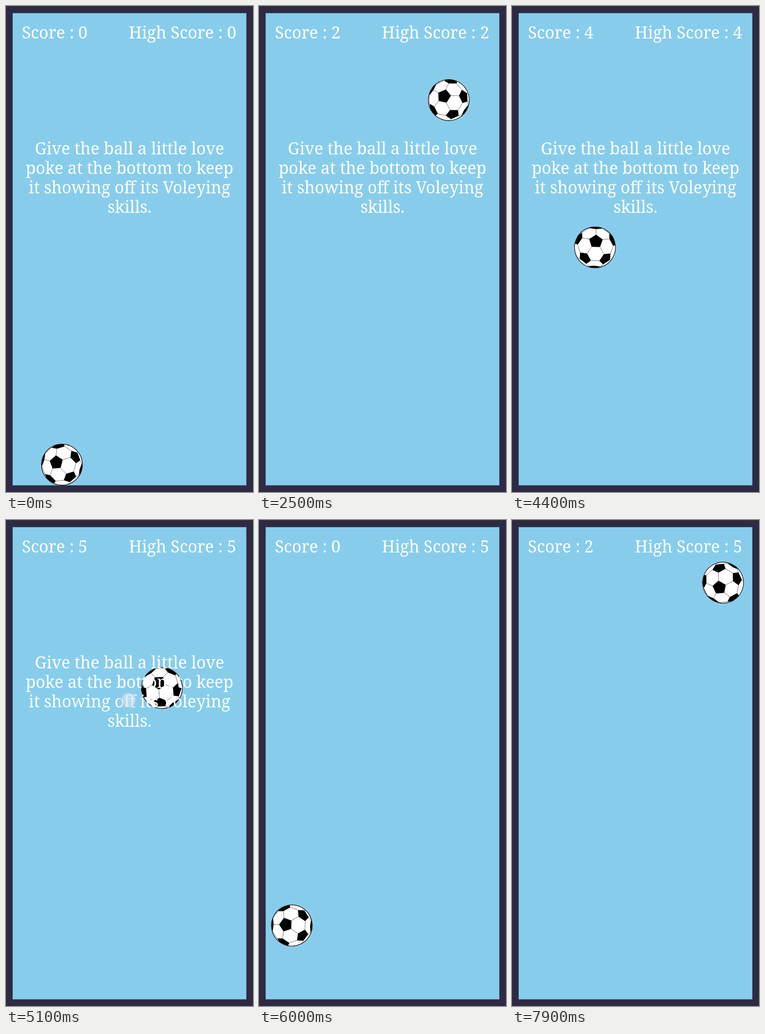
Write an HTML page with a canvas that moves like this. It is 534 by 1048 pixels and loops after 8000 ms.

```html
<!DOCTYPE html>
<html lang="en">
<head>
<meta charset="utf-8">
<title>Ball juggling</title>
<style>
html, body { margin: 0; width: 100%; height: 100%; overflow: hidden; background: #2d2a44; }
canvas { display: block; width: 534px; height: 1048px; }
</style>
</head>
<body>
<canvas id="stage" width="534" height="1048"></canvas>
<script>
const ctx = document.getElementById('stage').getContext('2d');
const LOOP = 8000, STEP = 100;
const RADIUS = 45, LEFT = 60, RIGHT = 474, FLOOR = 989;
const GRAVITY = 1040, KICK = 1026;
const DEG = Math.PI / 180;

// x is the unfolded path: it runs straight through the walls and is mirrored back.
const tap = (time, x, turn) => ({ time, x, turn });
const rounds = [
  [tap(0.07, 121, 0), tap(1.171, 129, 4), tap(2.82, 478, 21),
   tap(3.58, 727, 67), tap(4.425, 1016, 78)],
  [tap(6.13, -7, -20), tap(7.25, 0, -55)]
];
const taps = rounds.flat();
const path = [...taps, tap(8, -388, -77)];
const LANDING = 6.105, RESET = 5.9, SCORE_DELAY = 0.1;

const help = [
  'Give the ball a little love', 'poke at the bottom to keep',
  'it showing off its Voleying', 'skills.'
];

function mirror(x) {
  const width = RIGHT - LEFT;
  const p = (((x - LEFT) % (2 * width)) + 2 * width) % (2 * width);
  return LEFT + Math.min(p, 2 * width - p);
}

// Every tap adds the same upward kick; gravity acts from the first one on.
function heightAt(t) {
  const round = rounds[t < LANDING ? 0 : 1];
  const air = Math.max(0, t - round[0].time);
  const lift = round.reduce((sum, p) => sum + KICK * Math.max(0, t - p.time), 0);
  return Math.min(FLOOR, FLOOR - lift + GRAVITY / 2 * air * air);
}

function ballAt(t) {
  const next = Math.max(1, path.findIndex(p => p.time > t));
  const a = path[next - 1], b = path[next];
  const k = Math.max(0, (t - a.time) / (b.time - a.time));
  return {
    x: mirror(a.x + (b.x - a.x) * k),
    y: heightAt(t),
    turn: (a.turn + (b.turn - a.turn) * k) * DEG
  };
}

// The finger lands below the ball, on the side it is driven away from.
const touches = taps.map(({ time }) => {
  const { x, y } = ballAt(time);
  const side = Math.sign(x - ballAt(time + 0.05).x);
  return { start: time, end: time + 0.14, x: x + 32 * side, y: y + 38 };
});
touches.push({ start: 4.95, end: 5.03, x: 265, y: 388 });

// Truncated icosahedron, turned so that one pentagon faces the viewer off centre.
const dot = (a, b) => a[0] * b[0] + a[1] * b[1] + a[2] * b[2];
const blend = (a, b) => {
  const v = a.map((c, i) => 2 * c + b[i]);
  const length = Math.hypot(...v);
  return v.map(c => c / length);
};

function orient([x, y, z]) {
  const tilt = 18 * DEG, heading = 201 * DEG;
  const u = x * Math.cos(tilt) + z * Math.sin(tilt);
  const w = z * Math.cos(tilt) - x * Math.sin(tilt);
  return [u * Math.cos(heading) - y * Math.sin(heading),
          u * Math.sin(heading) + y * Math.cos(heading), w];
}

function ballPattern() {
  const corners = [[0, 0, 1], [0, 0, -1]];
  for (let i = 0; i < 5; i++) {
    const angle = (72 * i - 7) * DEG, z = 1 / Math.sqrt(5);
    const x = 2 * z * Math.cos(angle), y = 2 * z * Math.sin(angle);
    corners.push([x, y, z], [-x, -y, -z]);
  }
  const points = corners.map(orient);
  const patches = new Path2D(), seams = new Path2D();
  for (const a of points) {
    if (a[2] < -0.25) continue;
    const near = points.filter(b => Math.abs(dot(a, b) - 0.447) < 0.01);
    const around = b => Math.atan2(b[1] - a[1], b[0] - a[0]);
    const ring = near.map(b => blend(a, b)).sort((p, q) => around(p) - around(q));
    ring.forEach(([x, y], i) => patches[i ? 'lineTo' : 'moveTo'](x * RADIUS, y * RADIUS));
    patches.closePath();
    for (const b of near) {
      const from = blend(a, b), to = blend(b, a);
      if (from[2] < 0 || to[2] < 0) continue;
      seams.moveTo(from[0] * RADIUS, from[1] * RADIUS);
      seams.lineTo(to[0] * RADIUS, to[1] * RADIUS);
    }
  }
  return { patches, seams };
}
const pattern = ballPattern();

function disc(x, y, r) {
  ctx.beginPath();
  ctx.arc(x, y, r, 0, Math.PI * 2);
}

function drawField() {
  ctx.fillStyle = '#2d2a44';
  ctx.fillRect(0, 0, 534, 1048);
  ctx.fillStyle = '#3a352f';
  ctx.fillRect(0, 0, 534, 1.5);
  ctx.fillStyle = '#87cdeb';
  ctx.fillRect(14.5, 15.5, 505, 1018);
  ctx.strokeStyle = '#6489a2';
  ctx.lineWidth = 1;
  ctx.strokeRect(14.5, 15.5, 505, 1018);
}

function drawBall({ x, y, turn }) {
  ctx.save();
  ctx.translate(x, y);
  ctx.rotate(turn);
  disc(0, 0, RADIUS);
  ctx.fillStyle = '#fff';
  ctx.fill();
  ctx.save();
  ctx.clip();
  ctx.fillStyle = '#000';
  ctx.fill(pattern.patches);
  ctx.strokeStyle = '#888';
  ctx.lineWidth = 0.8;
  ctx.stroke(pattern.seams);
  ctx.restore();
  disc(0, 0, RADIUS - 0.7);
  ctx.strokeStyle = '#1c1c20';
  ctx.lineWidth = 1.4;
  ctx.stroke();
  ctx.restore();
}

function drawText(t) {
  const over = t >= RESET;
  const count = round => round.filter(p => p.time + SCORE_DELAY <= t).length;
  ctx.fillStyle = '#fff';
  ctx.font = '35.6px "Noto Serif", serif';
  ctx.textAlign = 'left';
  ctx.fillText('Score : ' + count(rounds[over ? 1 : 0]), 34.5, 70);
  ctx.fillText('High Score : ' + count(rounds[0]), 265.5, 70);
  if (over) return;
  ctx.textAlign = 'center';
  help.forEach((line, i) => ctx.fillText(line, 267, 319.7 + 42 * i));
}

function drawTouch(t, { start, end, x, y }) {
  const alpha = Math.min(1, 1 - (t - end) / 0.16);
  if (t < start || alpha <= 0) return;
  ctx.save();
  ctx.globalAlpha = alpha;
  const glow = ctx.createRadialGradient(x, y, 15, x, y, 23);
  glow.addColorStop(0, 'rgba(170,205,245,.6)');
  glow.addColorStop(1, 'rgba(170,205,245,0)');
  ctx.fillStyle = glow;
  disc(x, y, 23);
  ctx.fill();
  ctx.fillStyle = 'rgba(228,240,250,.75)';
  ctx.strokeStyle = 'rgba(125,155,200,.7)';
  ctx.lineWidth = 1.5;
  disc(x, y, 16);
  ctx.fill();
  ctx.stroke();
  ctx.restore();
}

function frame() {
  const t = Math.floor(performance.now() % LOOP / STEP) * STEP / 1000;
  drawField();
  drawBall(ballAt(t));
  drawText(t);
  touches.forEach(touch => drawTouch(t, touch));
  requestAnimationFrame(frame);
}
frame();
</script>
</body>
</html>
```
